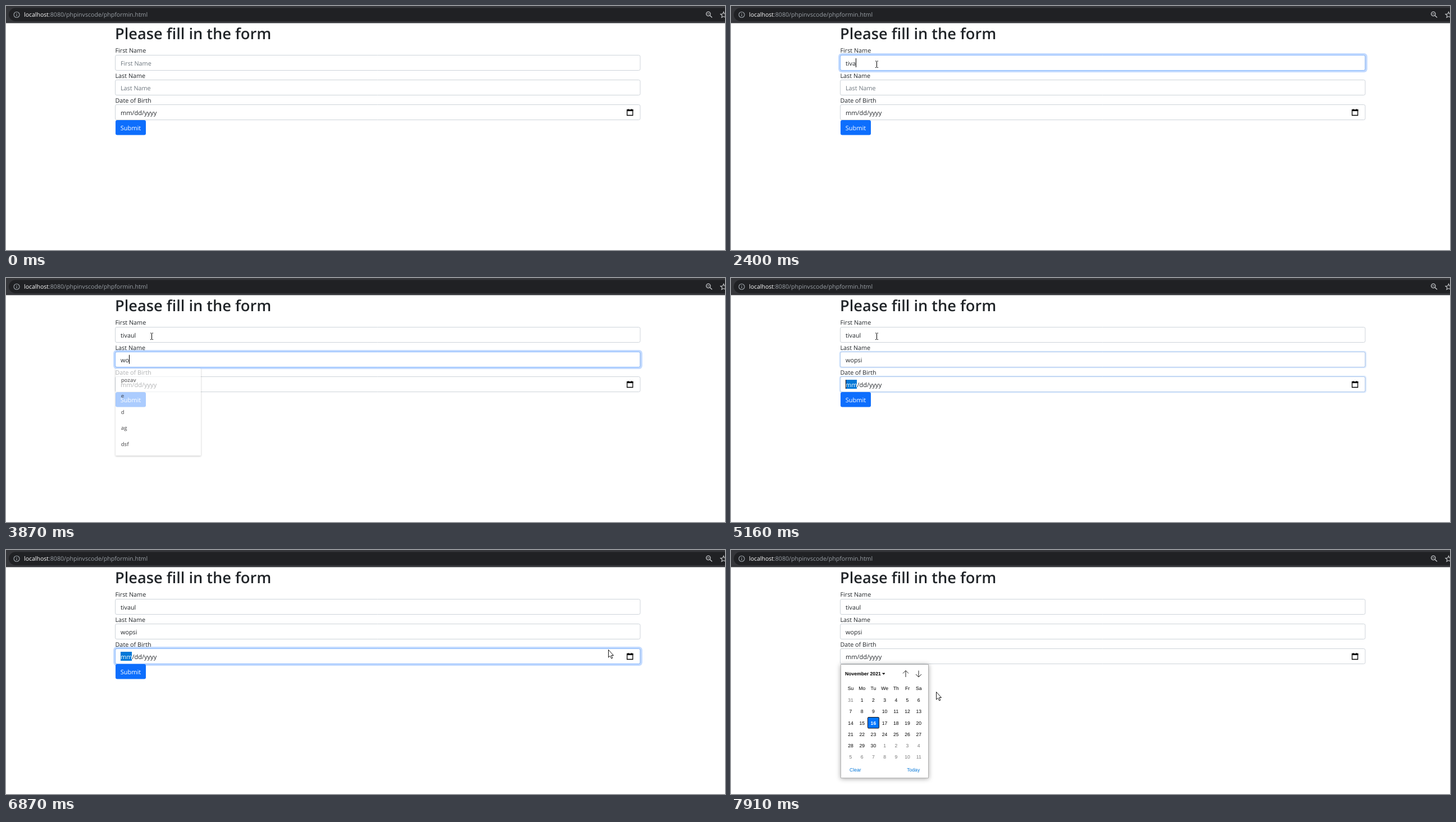
An HTML page with a canvas that plays this animation: 1280 by 434 pixels, repeating every 7.99 s.

```html
<!DOCTYPE html>
<html lang="en">
<head>
<meta charset="utf-8">
<title>Form</title>
<style>
html, body { margin: 0; width: 100%; height: 100%; overflow: hidden; background: #fff; }
canvas { display: block; }
</style>
</head>
<body>
<canvas id="stage" width="1280" height="434"></canvas>
<script>
const ctx = document.getElementById('stage').getContext('2d');
const LOOP = 7990;
const SANS = '"Open Sans", "Noto Sans", sans-serif';
const ARIAL = '"Liberation Sans", Arial, sans-serif';
const BODY = `10.8px ${SANS}`;
const INK = '#212529';

// Times at which each letter appears
const first = { text: 'tivaul', keys: [1740, 1940, 2140, 2400, 2670, 2670] };
const last = { text: 'wopsi', keys: [3800, 3870, 4070, 4200, 4340] };

// Pointer waypoints: time, x, y
const sweep = [
  [5760, 259, 103], [5900, 222, 103], [6040, 186, 128], [6200, 340, 170],
  [6400, 720, 185], [6590, 992, 179], [6870, 1072, 177], [7010, 1108, 185],
  [7285, 1111, 188], [7420, 1100, 190], [7560, 930, 206], [7770, 450, 246], [7910, 365, 252]
];

const within = (t, a, b) => t >= a && t < b;
const clamp = v => Math.max(0, Math.min(1, v));
const smooth = p => p * p * (3 - 2 * p);
const hold = (t, start, step) => start + Math.floor((t - start) / step) * step;
const rise = (t, start) => smooth(clamp((hold(t, start, 65) - start) / 130));
const focus = (t, a, b) => rise(t, a) - rise(t, b);

function popupLevel(t, open, close) {
  if (t < open + 65 || t >= close + 140) return 0;
  return t < open + 130 || t >= close + 70 ? 0.65 : 1;
}

function text(str, x, y, font = BODY, color = INK, align = 'left') {
  ctx.font = font;
  ctx.fillStyle = color;
  ctx.textAlign = align;
  ctx.fillText(str, x, y);
}

function rect(x, y, w, h, color) {
  ctx.fillStyle = color;
  ctx.fillRect(x, y, w, h);
}

function box(x, y, w, h, r, fill, stroke) {
  ctx.beginPath();
  ctx.roundRect(x, y, w, h, r);
  if (fill) { ctx.fillStyle = fill; ctx.fill(); }
  if (stroke) { ctx.strokeStyle = stroke; ctx.lineWidth = 1; ctx.stroke(); }
}

function path(d, color, width = 1, fill) {
  const p = new Path2D(d);
  if (fill) { ctx.fillStyle = fill; ctx.fill(p); }
  ctx.strokeStyle = color;
  ctx.lineWidth = width;
  ctx.stroke(p);
}

function drawToolbar() {
  rect(0, 0, 1280, 30.5, '#35363a');
  box(5, 3.5, 1320, 23.5, 11.7, '#202124');
  const grey = '#9aa0a6';
  path('M24 15.5A5 5 0 1 1 14 15.5A5 5 0 1 1 24 15.5', grey, 1.2);
  path('M19 14.8V18.2M19 12.6V13.8', grey, 1.2);
  text('localhost', 32, 19.4, `500 10.5px ${SANS}`, '#fff');
  const x = 32 + ctx.measureText('localhost').width;
  text(':8080/phpinvscode/phpformin.html', x, 19.4, `10.6px ${SANS}`, grey);
  const light = '#c8cacd';
  path('M1254 14A3.7 3.7 0 1 1 1246.6 14A3.7 3.7 0 1 1 1254 14M1253 16.7L1257 20.5', light, 1.3);
  path('M1248.5 14H1252.2', light);
  path('M1277.5 10.5L1279 14L1283 14.4L1280 17L1281 20.5L1277.5 18.6L1274 20.5L1275 17L1272 14.4L1276 14Z', light, 1.1);
}

function drawField(y, glow) {
  if (glow > 0) {
    const s = 2.9 * glow;
    box(194 - s, y - 0.5 - s, 936 + 2 * s, 28 + 2 * s, 3 + s, `rgba(13,110,253,${0.25 * glow})`);
  }
  box(194.5, y, 934.5, 27, 2.5, '#fff', '#ced4da');
  ctx.globalAlpha = glow;
  box(194.5, y, 934.5, 27, 2.5, null, '#86b7fe');
  ctx.globalAlpha = 1;
}

function drawEntry(t, entry, hint, y, caretOn) {
  const typed = entry.text.slice(0, entry.keys.filter(k => t >= k).length);
  text(typed || hint, 204, y, BODY, typed ? INK : '#6c757d');
  if (caretOn) rect(204 + Math.round(ctx.measureText(typed).width), y - 13, 1, 16, '#000');
}

function drawDate(t) {
  const font = `11px ${SANS}`;
  text('mm/dd/yyyy', 204, 193.5, font);
  if (within(t, 5090, 7350)) {
    rect(204, 181, 20, 16, '#0078d7');
    text('mm', 204, 193.5, font, '#fff');
  }
  if (within(t, 5090, 5630)) rect(204, 181, 1, 16, '#000');
  path('M1105.7 184.7H1115.8V194.5H1105.7Z', '#000', 1.3);
  rect(1105, 184, 11.5, 3, '#000');
  rect(1107, 183, 1.3, 2, '#000');
  rect(1113.2, 183, 1.3, 2, '#000');
}

function drawForm(t) {
  drawField(87.5, focus(t, 860, 2870));
  drawField(131.5, focus(t, 2870, 5090));
  drawField(175.5, focus(t, 5090, 7350));
  text('Please fill in the form', 194, 59, `600 27.2px ${SANS}`);
  text('First Name', 194.5, 83.3);
  text('Last Name', 194.5, 127.5);
  text('Date of Birth', 194.5, 171.7);
  drawEntry(t, first, 'First Name', 106, within(t, 860, 1390) || within(t, 1740, 2870));
  drawEntry(t, last, 'Last Name', 149.7, within(t, 2870, 3400) || within(t, 3800, 4870));
  drawDate(t);
  box(195, 203, 54, 26.5, 3, '#0d6efd');
  text('Submit', 203.7, 220.5, `11px ${SANS}`, '#fff');
}

function dropShadow(x, y, w, h, blur) {
  // Only the part outside the panel, so a fading panel stays white
  ctx.save();
  ctx.beginPath();
  ctx.rect(0, 0, 1280, 434);
  ctx.rect(x, y, w, h);
  ctx.clip('evenodd');
  ctx.shadowColor = 'rgba(0,0,0,.35)';
  ctx.shadowBlur = blur;
  ctx.shadowOffsetY = 1;
  rect(x, y, w, h, '#fff');
  ctx.restore();
}

function panel(x, y, w, h, level, border, blur, content) {
  if (!level) return;
  const scale = 0.96 + 0.04 * level, cx = x + w / 2, cy = y + h / 2;
  ctx.save();
  ctx.globalAlpha = level;
  ctx.translate(cx, cy);
  ctx.scale(scale, scale);
  ctx.translate(-cx, -cy);
  dropShadow(x, y, w, h, blur);
  box(x, y, w, h, border ? 0 : 2.5, '#fff');
  if (border) box(x + 0.5, y + 0.5, w - 1, h - 1, 0, null, border);
  content();
  ctx.restore();
}

function drawSuggestions(y, words, level) {
  panel(194, y, 154, 12.8 + 28.8 * words.length, level, null, 3, () =>
    words.forEach((word, i) =>
      text(word, 203.7, y + 24.3 + 28.8 * i, `600 9.7px ${SANS}`, '#202124')));
}

function drawCalendar() {
  const plain = `8.64px ${ARIAL}`, bold = `bold ${plain}`, blue = '#0075d8';
  text('November 2021', 203, 223, bold, '#000');
  path('M269.5 219H274L271.8 221.4Z', '#000', 0.6, '#000');
  path('M311 226V214.5M306 219.5L311 214.5L316 219.5M334 214.5V226M329 221L334 226L339 221', '#222');
  const colX = c => 213 + 20.2 * c;
  ['Su', 'Mo', 'Tu', 'We', 'Th', 'Fr', 'Sa'].forEach((d, c) => text(d, colX(c), 248.6, plain, '#000', 'center'));
  for (let i = 0; i < 42; i++) {
    const number = i === 0 ? 31 : i <= 30 ? i : i - 30;
    const x = colX(i % 7), y = 270.2 + 20.25 * Math.floor(i / 7);
    const today = i === 16;
    if (today) box(243.5, 297.5, 20, 19.5, 1.5, '#0075ff', '#101010');
    const color = today ? '#fff' : within(i, 1, 31) ? '#000' : '#767676';
    text(number, x, y, today ? bold : plain, color, 'center');
  }
  text('Clear', 211, 394, plain, blue);
  text('Today', 324.7, 394, plain, blue, 'center');
}

function pointerAt(t) {
  if (t < 5830) {
    const p = clamp((hold(t, 130, 65.7) - 130) / 459), e = 1 - (1 - p) ** 2;
    return [1039 - 780 * e, 399 - 296 * e];
  }
  const now = Math.min(hold(t, 5830, 69.33), 7910);
  const i = Math.max(1, sweep.findIndex(w => w[0] >= now));
  const [t0, x0, y0] = sweep[i - 1], [t1, x1, y1] = sweep[i];
  const p = (now - t0) / (t1 - t0);
  return [x0 + (x1 - x0) * p, y0 + (y1 - y0) * p];
}

function drawPointer(t) {
  if (t < 130) return;
  const [x, y] = pointerAt(t).map(Math.round);
  const overText = within(x, 195, 1129) && (within(y, 87, 115) || within(y, 131, 159));
  ctx.save();
  ctx.translate(x + 0.5, y + 0.5);
  if (overText) path('M-2.5 -5.5H-.8M.8 -5.5H2.5M0 -5V5.5M-2.5 6H-.8M.8 6H2.5', '#000');
  else path('M0 0V13.5L3 10.8L5.3 15.5L7.3 14.6L5.2 10H9Z', '#000', 0.9, '#fff');
  ctx.restore();
}

function draw(t) {
  rect(0, 0, 1280, 434, '#fff');
  drawToolbar();
  drawForm(t);
  drawSuggestions(116, ['wubat', 'ad', 'a', 'as'], popupLevel(t, 860, 1740));
  drawSuggestions(160, ['pozav', 'e', 'd', 'ag', 'dsf'], popupLevel(t, 2870, 3800));
  panel(195, 203, 157, 203, popupLevel(t, 7285, Infinity), '#b0b0b0', 8, drawCalendar);
  drawPointer(t);
}

ctx.textRendering = 'geometricPrecision';
function tick(now) {
  draw(now % LOOP);
  requestAnimationFrame(tick);
}
requestAnimationFrame(tick);
</script>
</body>
</html>
```
